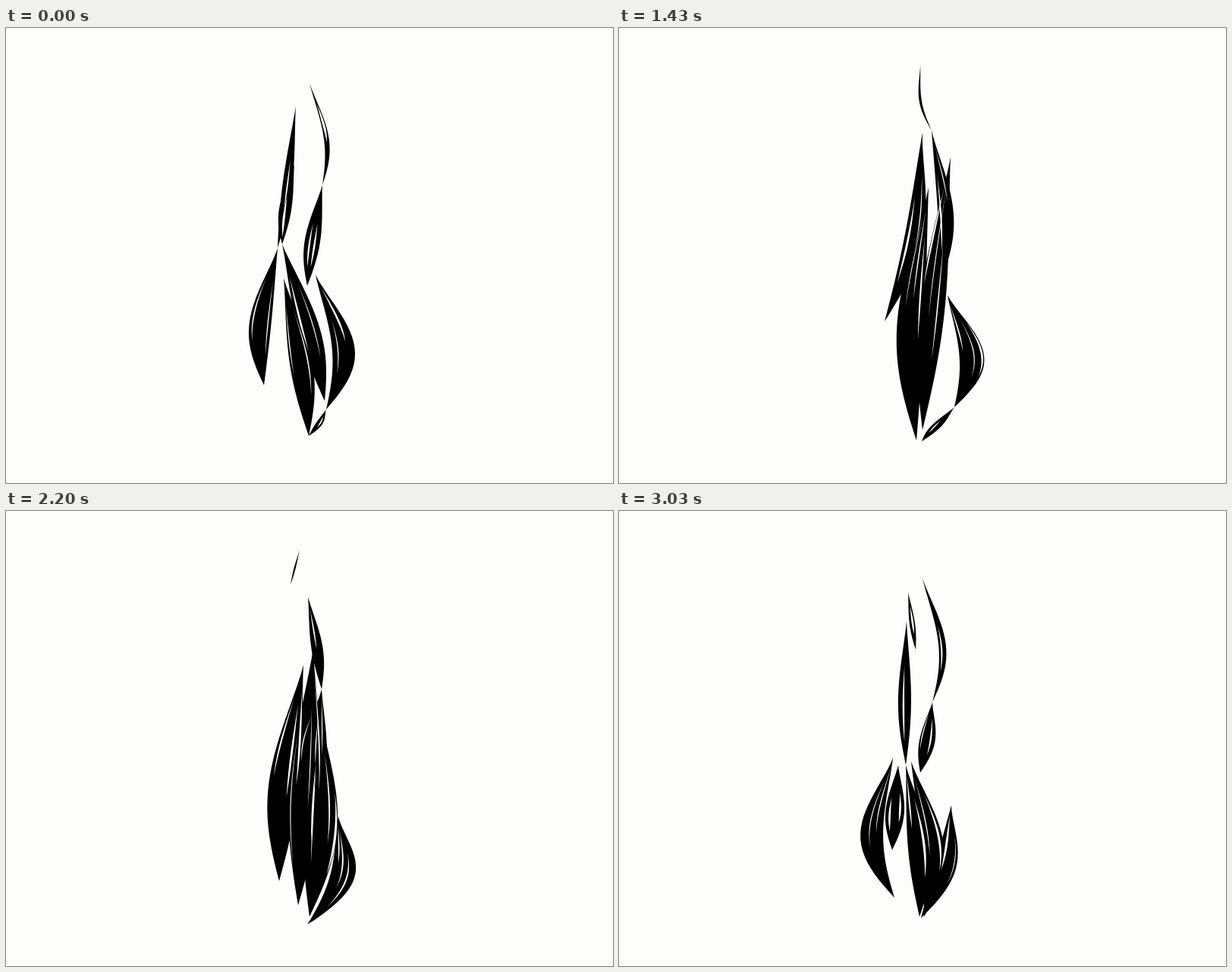
Recreate the animation shown at these times as an HTML page with a canvas. Size 800 by 600 pixels, loop 3.06 s.

```html
<!DOCTYPE html>
<html lang="en">
<head>
<meta charset="utf-8">
<title>Ink flame</title>
<style>
html, body { margin: 0; width: 100%; height: 100%; overflow: hidden; background: #fdfdfc; }
canvas { display: block; }
</style>
</head>
<body>
<canvas id="stage" width="800" height="600"></canvas>
<script>
const PAPER = '#fdfdfc', INK = '#000';
const LOOP = 3060, TICKS = 92, AXIS = 397, BASE = 545, TOP = 35, STEPS = 24;
const ctx = document.getElementById('stage').getContext('2d');
const clamp = (v, lo, hi) => Math.min(hi, Math.max(lo, v));
const mix = (a, b, s) => a + (b - a) * s;

// Each stream runs through [x, y, bend] points; the bend shapes the lock
// to the next point. Lock widths follow from height and the wave's weight.
const fading = [
  [[382, 103, 2], [358, 290, -13], [340, 471]],
  [[380, 180, -3], [364, 285, 5], [420, 492]],
  [[366, 330, 5], [399, 538]],
  [[400, 72, 13], [417, 207, -2], [397, 340]],
  [[408, 325, 29], [422, 503, 3], [399, 538]]
];
const embers = [
  [[425, 79, 1], [424, 115]],
  [[402, 91, 0], [397, 123]],
  [[410, 127, 0], [382, 207]],
  [[397, 242, -2], [388, 284]]
];
const hooked = [
  [[397, 48, -8], [412, 135, 12], [424, 335]],
  [[400, 138, 16], [350, 387]],
  [[408, 210, -15], [392, 544]],
  [[437, 170, -4], [400, 530]],
  [[433, 352, 27], [442, 500, 0], [399, 545]]
];
const woven = [
  [[390, 41, -1], [428, 113]],
  [[362, 57, -5], [380, 133]],
  [[402, 112, 24], [412, 297, 37], [420, 515]],
  [[393, 125, -8], [372, 457, -3], [402, 541]],
  [[406, 240, -2], [380, 400]],
  [[357, 362, -3], [368, 480]],
  [[402, 325, 6], [405, 541]],
  [[434, 272, -2], [446, 380]]
];
const dense = [
  [[387, 51, 0], [375, 97]],
  [[398, 113, 2], [416, 235, -9], [414, 390]],
  [[392, 203, -8], [360, 488]],
  [[405, 180, 0], [385, 520]],
  [[413, 260, 9], [400, 535]],
  [[438, 402, 28], [397, 546]]
];
const knotted = [
  [[391, 89, 0], [424, 146]],
  [[380, 108, 30], [415, 295, 4], [417, 482]],
  [[392, 175, 0], [388, 350, 2], [399, 543]],
  [[440, 195, 13], [435, 345, -2], [458, 447]],
  [[412, 230, -2], [405, 400]],
  [[375, 300, 2], [368, 445]]
];
const bulb = [
  [[381, 107, 0], [391, 183]],
  [[400, 88, 19], [413, 252, 2], [397, 345]],
  [[379, 145, -2], [378, 335, 8], [396, 535]],
  [[361, 325, -29], [363, 510]],
  [[368, 335, 0], [360, 447]],
  [[385, 330, 19], [402, 535]],
  [[438, 388, 14], [398, 537]]
];
const rising = bulb.map(stream =>
  stream.map(([x, y, bend]) => [2 * AXIS - x, y, -bend]));

// Outline of the whole plume: narrow root, full belly, long thin tip.
function plume(y) {
  const s = clamp((BASE - y) / (BASE - TOP), 0, 1);
  return Math.sqrt(s) * (1 - s) ** 1.6;
}

function seeded(seed) {
  return () => {
    const v = Math.sin(seed++ * 12.9898) * 43758.5453;
    return v - Math.floor(v);
  };
}

function makeWave(streams, full, first, last, weight) {
  const random = seeded(full + 1), locks = [];
  for (const stream of streams) {
    for (let i = 1; i < stream.length; i++) {
      const [x0, y0, bend] = stream[i - 1], [x1, y1] = stream[i];
      const size = Math.hypot(x1 - x0, y1 - y0);
      const width = Math.min(95 * weight * plume((y0 + y1) / 2), .22 * size);
      const count = Math.round(width / 12), slits = [];
      for (let k = 0; k < count; k++) {
        const from = mix(.05, .4, random());
        slits.push({
          from, to: from + mix(.35, .55, random()),
          side: (2 * k + 1) / count - 1 + mix(-.3, .3, random()),
          thick: mix(1, 3.2, random())
        });
      }
      locks.push({ x0, y0, x1, y1, bend, width, slits });
    }
  }
  return { locks, full, first, last };
}

// Streams, tick of full form, first tick, last tick, weight.
const waves = [
  makeWave(fading, 0, -14, 14, 1),
  makeWave(embers, 14, 0, 18, .7),
  makeWave(rising, 32, 23, 43, 1),
  makeWave(hooked, 43, 32, 56, 1.25),
  makeWave(woven, 56, 43, 66, 1.05),
  makeWave(dense, 66, 56, 79, 1.5),
  makeWave(knotted, 79, 66, 91, 1),
  makeWave(bulb, 91, 79, 105, 1)
];

// Carries a point up the plume, following its outline.
function carry(x, y, lift) {
  const to = clamp(y - lift, TOP, BASE);
  const scale = (plume(to) + .03) / (plume(y) + .03);
  return [AXIS + (x - AXIS) * Math.min(1.8, scale), to];
}

const hump = s => Math.sin(Math.PI * s ** 1.2);

// Fills a sliver of a lock: side -1..1 across it, from..to along it.
function sliver(lock, lift, thick, side = 0, from = 0, to = 1) {
  const edge = (i, sign) => {
    const s = mix(from, to, i / STEPS), h = hump(s);
    const x = mix(lock.x0, lock.x1, s) + h * (lock.bend + side * lock.width / 2);
    const half = thick / 2 * hump(i / STEPS);
    ctx.lineTo(...carry(x + sign * half, mix(lock.y0, lock.y1, s), lift));
  };
  ctx.beginPath();
  for (let i = 0; i <= STEPS; i++) edge(i, -1);
  for (let i = STEPS; i >= 0; i--) edge(i, 1);
  ctx.fill();
}

function draw(tick) {
  ctx.fillStyle = PAPER;
  ctx.fillRect(0, 0, 800, 600);
  const live = [];
  for (const { locks, full, first, last } of waves) {
    const dt = tick - full, gap = dt < 0 ? full - first : last - full;
    const life = Math.min(1, 2.2 * (1 - Math.abs(dt) / gap));
    const lift = dt * clamp(500 / gap, 38, 55);
    if (life > .01) for (const lock of locks) live.push({ lock, lift, life });
  }
  ctx.fillStyle = INK;
  for (const { lock, lift, life } of live) sliver(lock, lift, lock.width * life);
  ctx.fillStyle = PAPER;
  for (const { lock, lift, life } of live)
    for (const { thick, side, from, to } of lock.slits)
      sliver(lock, lift, thick * life, side * life, from, to);
}

const start = performance.now();
function frame() {
  const t = (performance.now() - start) % LOOP;
  let tick = Math.min(TICKS - 1, Math.floor(t / LOOP * TICKS + .08));
  if (tick % 4 === 1) tick--; // 24 drawings a second on a 30 Hz clock
  draw(tick);
  requestAnimationFrame(frame);
}
frame();
</script>
</body>
</html>
```
